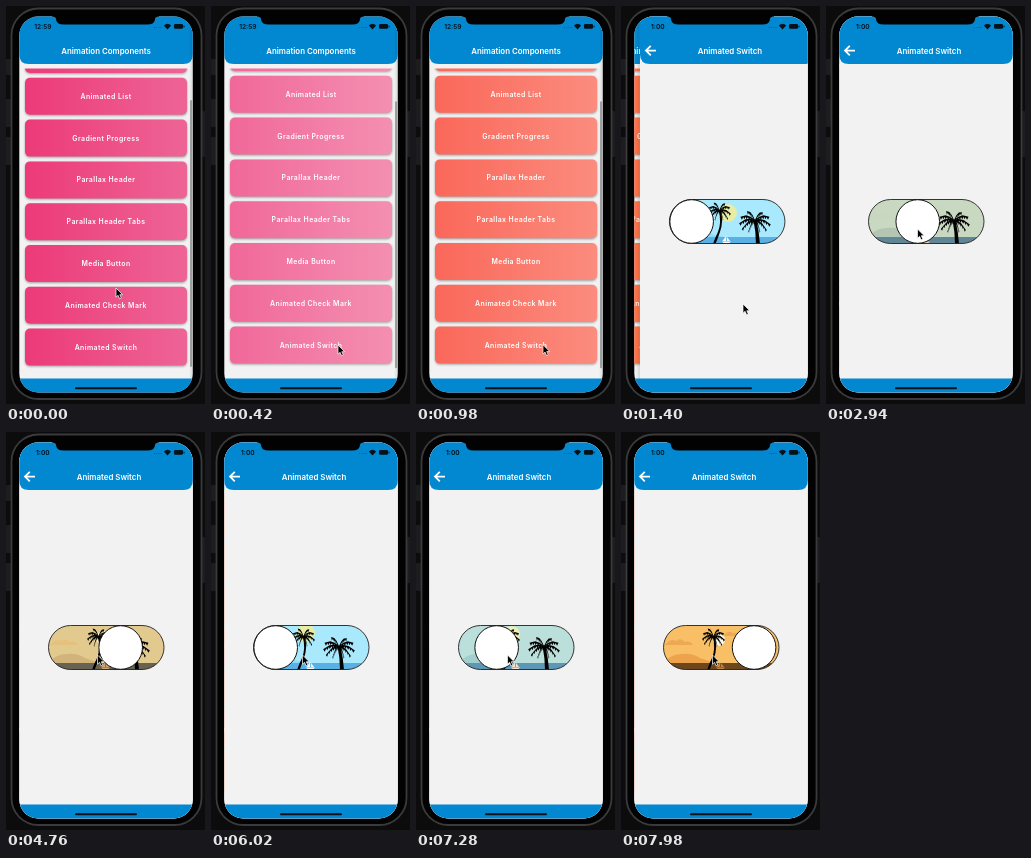
Write an HTML page that moves like this. It is 199x398 px and loops after 8000 ms.

```html
<!DOCTYPE html>
<html lang="en">
<head>
<meta charset="utf-8">
<title>Animated switch</title>
<style>
  html, body { margin: 0; width: 100%; height: 100%; overflow: hidden; background: #0c0c0c; }
  svg { display: block; width: 100vw; height: 100vh; }
  text { font-family: Inter, Roboto, sans-serif; font-weight: 600; text-anchor: middle; fill: #fff; }
  .title { font-size: 7.9px; }
  .label { font-size: 6.9px; letter-spacing: .42px; }
  .clock { font-size: 6.6px; fill: #04121c; }
  .btn { filter: drop-shadow(0 1px 1px rgba(0, 0, 0, .35)); }
  .blue { fill: #0288d1; }
</style>
</head>
<body>
<svg viewBox="0 0 199 398">
  <defs>
    <clipPath id="screen"><rect x="13.3" y="10.5" width="173.5" height="376" rx="19"/></clipPath>
    <clipPath id="listArea"><rect x="13" y="62.5" width="174" height="310"/></clipPath>
    <clipPath id="track"><rect x="42.5" y="193.5" width="115.5" height="44" rx="22"/></clipPath>
    <linearGradient id="fill">
      <stop id="from" offset="0"/>
      <stop id="to" offset="1"/>
    </linearGradient>
    <linearGradient id="edge">
      <stop offset="0" stop-opacity="0"/>
      <stop offset="1" stop-opacity=".12"/>
    </linearGradient>
    <path id="header" class="blue" d="M13 10H187V48Q187 58 177 58H23Q13 58 13 48Z"/>
  </defs>

  <g fill="#1d1d1f">
    <rect y="53" width="5" height="16" rx="1"/>
    <rect y="93" width="5" height="28" rx="1"/>
    <rect y="131" width="5" height="28" rx="1"/>
    <rect x="194" y="105" width="5" height="46" rx="1"/>
  </g>
  <rect x="5.5" y="2.5" width="190" height="390.5" rx="27" fill="#020202" stroke="#3a3a3c" stroke-width="1.8"/>

  <g clip-path="url(#screen)">
    <rect x="13" y="10" width="174" height="377" fill="#f2f2f2"/>
    <g id="list">
      <g clip-path="url(#listArea)"><g id="rows"></g></g>
      <rect id="bar" x="184" y="94" width="2" height="267" rx="1" fill="#a5a7a8"/>
      <use href="#header"/>
      <text class="title" x="100" y="47.6">Animation Components</text>
    </g>

    <g id="page">
      <rect x="9" y="10" width="4" height="377" fill="url(#edge)"/>
      <rect x="13" y="10" width="174" height="377" fill="#f2f2f2"/>
      <use href="#header"/>
      <path d="M29 44.6H19.5M23.8 39.8L19 44.6L23.8 49.4" fill="none" stroke="#fff" stroke-width="1.8"/>
      <text class="title" x="103" y="47.6">Animated Switch</text>

      <g clip-path="url(#track)">
        <rect id="sky" x="42" y="193" width="117" height="45"/>
        <circle id="sun"/>
        <path id="cloud" d="M46 211q4-5 9-2q4-4 9 1q5-2 8 3H44zM104 202q4-4 8-1q5-2 7 3h-16z" fill="#eda650"/>
        <path id="hill" d="M42 231Q50 222 61 222Q71 221 79 226Q88 230 98 231Z"/>
        <rect id="sea" x="42" y="231" width="117" height="7"/>
        <path id="boat" d="M99.2 230V235H95.5ZM100 231L103 235H100ZM95 235.5H104L102.5 237H96.5Z"/>
        <g id="palms"></g>
      </g>
      <rect x="42.5" y="193.5" width="115.5" height="44" rx="22" fill="none" stroke="#222" stroke-width=".9"/>
      <circle id="thumb" cy="215.5" r="21.8" fill="#fff" stroke="#111" stroke-width="1"/>
    </g>

    <rect class="blue" x="13" y="372.5" width="174" height="15"/>
    <rect x="69" y="381.3" width="62" height="2" rx="1" fill="#07121b"/>
    <text id="clock" class="clock" x="36.8" y="23"></text>
    <g fill="#04121c">
      <g fill-opacity=".4">
        <circle cx="148.5" cy="21.5" r=".6"/><circle cx="150.7" cy="21.5" r=".6"/>
        <circle cx="152.9" cy="21.5" r=".6"/><circle cx="155.1" cy="21.5" r=".6"/>
      </g>
      <path d="M161.5 23.6L157.8 19.4Q161.5 16.2 165.2 19.4Z"/>
      <rect x="168" y="18" width="9" height="4.8" rx="1.3"/>
      <rect x="177.5" y="19.4" width="1" height="2" rx=".5"/>
    </g>
  </g>

  <path d="M46 9V10.5Q50 10.5 50 13Q50 18.5 58 18.5H141Q149 18.5 149 13Q149 10.5 153 10.5V9Z" fill="#020202"/>
  <path id="cursor" d="M0 0V9.2L2.1 7.3L3.6 10.8L5.3 10L3.8 6.7H6.7Z" fill="#000" stroke="#fff" stroke-width=".7"/>
</svg>

<script>
  const LOOP = 8000, STEP = 140, SLIDE = 1000, TOGGLE = 1200, WIDTH = 174;
  const $ = id => document.getElementById(id);
  const set = (id, attrs) => Object.entries(attrs).forEach(([k, v]) => $(id).setAttribute(k, v));
  const clamp = x => Math.min(1, Math.max(0, x));
  const lerp = (a, b, p) => a + (b - a) * p;
  const sine = p => (1 - Math.cos(Math.PI * clamp(p))) / 2;
  const mix = (a, b, p) => `rgb(${a.map((v, i) => Math.round(lerp(v, b[i], p)))})`;

  // Value between timed keys [time, ...values]
  function track(keys, t, ease = clamp) {
    const i = Math.max(0, keys.findLastIndex(k => k[0] <= t));
    const a = keys[i], b = keys[i + 1] || a;
    const p = a === b ? 0 : ease((t - a[0]) / (b[0] - a[0]));
    return a.slice(1).map((v, j) => lerp(v, b[j + 1], p));
  }

  const labels = ['', 'Animated List', 'Gradient Progress', 'Parallax Header',
    'Parallax Header Tabs', 'Media Button', 'Animated Check Mark', 'Animated Switch'];
  $('rows').innerHTML = labels.map((label, i) => {
    const y = 30 + i * 41.8;
    return `<rect class="btn" x="19" y="${y}" width="162" height="37" rx="5" fill="url(#fill)"/>
      <text class="label" x="100" y="${y + 21}">${label}</text>`;
  }).join('');

  // Each frond arches from the crown to its tip, with leaflets hanging below
  const tips = [[-12, 3], [-10, 8], [-11, -3], [-6, -8], [0, -9], [6, -7],
    [11, -3], [12, 4], [9, 9], [-5, 10], [4, 10]];
  function frond([x, y]) {
    const at = (s, drop) => `${x * s} ${y * s - 10 * s * (1 - s) + drop}`;
    let d = `M0 0L${at(.3, 0)}L${at(.6, 0)}L${at(1, 0)}`;
    for (let s = .9; s > .2; s -= .16) d += `L${at(s, 3.4)}L${at(s - .1, 1.3)}`;
    return d + 'L0 2Z';
  }
  const crown = (x, y, sx, sy) =>
    `<g transform="translate(${x} ${y}) scale(${sx} ${sy})">${tips.map(p => `<path d="${frond(p)}"/>`).join('')}</g>`;
  $('palms').innerHTML = crown(92.5, 204, .95, .95) + crown(128, 214, 1.32, 1.12) +
    `<path d="M91.5 204Q95 216 91 226Q88 232 86 238H88.5Q91 232 93 226Q97 215 93.5 204Z
      M126.5 214Q129 226 129 238H133Q132 225 129.5 214Z"/>`;

  const pointer = [[0, 110, 282], [420, 127, 339], [960, 127, 339], [1400, 122, 298], [2100, 91.5, 223]];
  const left = [[0, 236, 58, 120], [420, 240, 104, 153], [1250, 255, 104, 60]];
  const right = [[0, 238, 100, 150], [420, 244, 143, 177], [1250, 255, 138, 101]];

  // Switch position, then the sun's centre
  const switches = [[0, 0, 101, 207], [2428, 0, 101, 207], [2428 + TOGGLE, 1, 98, 208],
    [4328, 1, 98, 208], [4328 + TOGGLE, 0, 95, 201], [6900, 0, 95, 201], [6900 + TOGGLE, 1, 98, 208]];

  function draw(t) {
    const scroll = -2 * sine(t / 420);
    set('rows', { transform: `translate(0 ${scroll})` });
    set('bar', { y: 94 - scroll * .6 });
    set('from', { 'stop-color': `rgb(${track(left, t)})` });
    set('to', { 'stop-color': `rgb(${track(right, t)})` });

    // Critically damped push
    const w = Math.max(0, t - SLIDE) * .013;
    const rest = t > 2100 ? 0 : (1 + w) * Math.exp(-w);
    set('page', { transform: `translate(${WIDTH * rest} 0)` });
    set('list', { transform: `translate(${-WIDTH * .3 * (1 - rest)} 0)` });
    $('clock').textContent = t < SLIDE ? '12:59' : '1:00';

    const [p, sunX, sunY] = track(switches, t, sine);
    set('thumb', { cx: lerp(64.7, 134.8, p) });
    set('sky', { fill: mix([168, 233, 253], [250, 190, 98], p) });
    set('hill', { fill: mix([140, 220, 246], [238, 162, 72], p) });
    set('sea', { fill: mix([88, 176, 228], [108, 68, 24], p) });
    set('boat', { fill: mix([255, 255, 255], [190, 130, 60], p) });
    set('cloud', { opacity: p ** 4 });
    set('sun', { cx: sunX, cy: sunY, r: lerp(9, 6, p),
      fill: mix([232, 236, 165], [255, 250, 236], p) });

    const [x, y] = track(pointer, t, sine);
    set('cursor', { transform: `translate(${x} ${y})` });
  }

  function tick() {
    const t = performance.now() % LOOP;
    draw(Math.floor(t / STEP) * STEP);
    requestAnimationFrame(tick);
  }
  tick();
</script>
</body>
</html>
```
